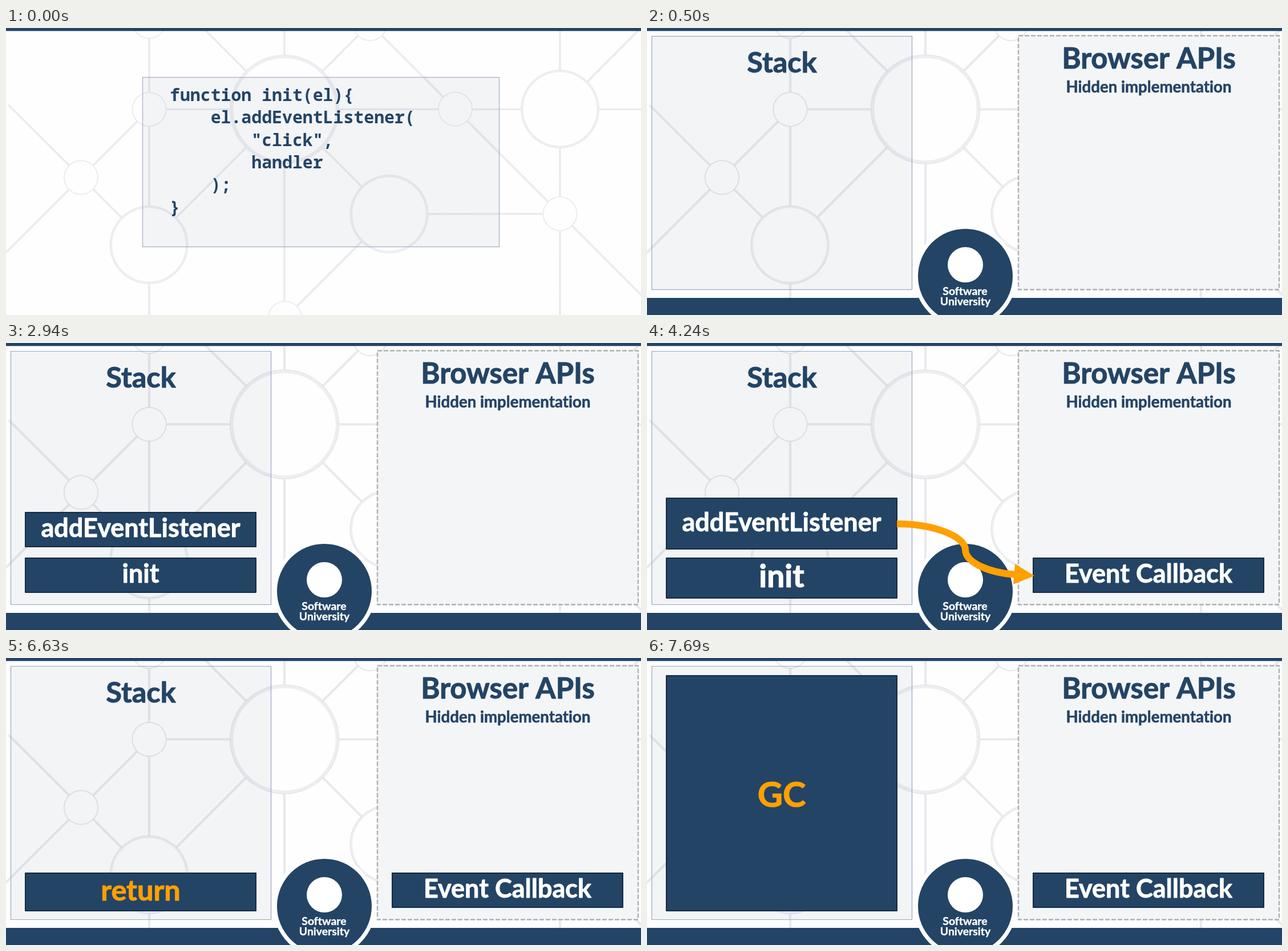
Recreate the animation shown at these times as an HTML page with a canvas. Size 1113x503 px, loop 8 s.

```html
<!DOCTYPE html>
<html lang="en">
<head>
<meta charset="utf-8">
<title>Call stack and browser APIs</title>
<style>
  html, body { margin: 0; width: 100%; height: 100%; overflow: hidden; background: #fff; }
  canvas { display: block; }
</style>
</head>
<body>
<canvas id="stage" width="1113" height="503"></canvas>
<script>
const W = 1113, H = 503, LOOP = 8000;
const NAVY = '#234465', EDGE = '#152c44', ORANGE = '#ffa000', PAPER = '#fefefe';
const TINT = 'rgba(35, 67, 101, 0.05)';
const SANS = 'Lato, sans-serif', MONO = '"Noto Sans Mono", monospace';
const ctx = document.getElementById('stage').getContext('2d');

function disc({ x, y }, r, color) {
  ctx.fillStyle = color;
  ctx.beginPath();
  ctx.arc(x, y, r, 0, Math.PI * 2);
  ctx.fill();
}

function rect(left, top, right, bottom, fill, stroke, width) {
  ctx.fillStyle = fill;
  ctx.fillRect(left, top, right - left, bottom - top);
  ctx.strokeStyle = stroke;
  ctx.lineWidth = width;
  ctx.strokeRect(left, top, right - left, bottom - top);
}

function text(str, x, y, size, color = NAVY) {
  ctx.font = `bold ${size}px ${SANS}`;
  ctx.letterSpacing = '0.01px'; // keeps letters apart instead of joined as ligatures
  ctx.textAlign = 'center';
  ctx.lineJoin = 'round';
  ctx.lineWidth = size * 0.02;
  ctx.fillStyle = ctx.strokeStyle = color;
  ctx.fillText(str, x, y);
  ctx.strokeText(str, x, y);
}

// The network grows out of one hub in straight and diagonal steps.
const SMALL = 30.5, MEDIUM = 69, LARGE = 96;
const step = (from, dx, dy, length, r) =>
  ({ x: from.x + dx * length, y: from.y + dy * length, r });

const hub = { x: 488, y: 142.5, r: LARGE };
const west = step(hub, -1, 0, 237, SMALL);
const northWest = step(west, 0, -1, 154, SMALL);
const farWest = step(west, -1, 1, 119.5, SMALL);
const southWest = step(hub, -1, 1, 237.5, MEDIUM);
const south = step(hub, 1, 1, 183.5, MEDIUM);
const bottom = step(south, -1, 1, 182.5, SMALL);
const north = step(hub, 1, -1, 150, SMALL);
const east = step(north, 1, 1, 149.5, SMALL);
const southEast = step(east, 1, 1, 183.5, SMALL);
const farEast = step(southEast, 0, -1, 183.5, MEDIUM);
const nodes = [hub, west, northWest, farWest, southWest, south, bottom, north, east, southEast, farEast];

const links = [
  [west, step(west, 1, 0, W)],
  [south, southEast],
  [south, bottom],
  [south, step(hub, -1, -1, hub.y)],
  [southWest, north],
  [southWest, step(farWest, -1, -1, 127)],
  [west, step(farWest, -1, 1, 200)],
  [north, step(southEast, 1, 1, 200)],
  [farEast, step(farEast, 1, -1, 200)],
  ...[west, hub, farEast].map(n => [step(n, 0, -1, H), step(n, 0, 1, H)])
];

function strokeLinks(color, width) {
  ctx.strokeStyle = color;
  ctx.lineWidth = width;
  ctx.beginPath();
  for (const [a, b] of links) {
    ctx.moveTo(a.x, a.y);
    ctx.lineTo(b.x, b.y);
  }
  ctx.stroke();
}

function network(outline, core) {
  ctx.fillStyle = PAPER;
  ctx.fillRect(0, 0, W, H);
  strokeLinks(outline, 3.6);
  strokeLinks(core, 1.8);
  for (const n of nodes) {
    disc(n, n.r, outline);
    disc(n, n.r - 0.8, '#eeeef2');
    disc(n, n.r - (n.r === SMALL ? 2 : n.r * 0.065), PAPER);
  }
  ctx.fillStyle = NAVY;
  ctx.fillRect(0, 0, W, 5.3);
}

const CODE = `function init(el){
    el.addEventListener(
        "click",
        handler
    );
}`;

function codeSlide() {
  network('#ebebee', '#ebebee');
  rect(239.5, 86.5, 864.5, 383.5, TINT, '#a3abbf', 1.2);
  ctx.font = `bold 29.85px ${MONO}`;
  ctx.letterSpacing = '0px';
  ctx.textAlign = 'left';
  ctx.fillStyle = NAVY;
  CODE.split('\n').forEach((row, i) => ctx.fillText(row, 287, 128 + i * 39.3));
}

function badge() {
  const center = { x: 558, y: 435 };
  disc(center, 90, PAPER);
  disc(center, 83, NAVY);
  disc({ x: 558, y: 415 }, 31, '#fff');
  text('Software', 557.5, 468, 19.4, '#fff');
  text('University', 558, 486, 19.4, '#fff');
}

function panels() {
  network('#dedfe3', '#eeeef0');
  rect(8.5, 14.5, 464.5, 458.5, TINT, '#9aa6c2', 1.2);
  ctx.setLineDash([8, 3]);
  rect(651, 13.5, 1108, 458.5, '#f4f5f6', '#b0b0b0', 2.4);
  ctx.setLineDash([]);
  ctx.fillStyle = NAVY;
  ctx.fillRect(0, 473, W, 30);
  badge();
  text('Stack', 236.5, 78, 50.5);
  text('Browser APIs', 879.5, 71, 50.8);
  text('Hidden implementation', 879.5, 112.5, 27.6);
}

// A navy label box; drop sets the baseline below its middle, in ems.
function box(label, top, bottom, size, { color = '#fff', left = 34, drop = 0.29 } = {}) {
  const width = 404;
  rect(left, top, left + width, bottom, NAVY, EDGE, 2);
  text(label, left + width / 2, (top + bottom) / 2 + drop * size, size, color);
}

function arrow() {
  ctx.strokeStyle = ctx.fillStyle = ORANGE;
  ctx.lineWidth = 12;
  ctx.beginPath();
  ctx.moveTo(438, 317);
  ctx.bezierCurveTo(505, 317, 558, 340, 558, 362);
  ctx.bezierCurveTo(558, 385, 600, 403, 647, 406);
  ctx.stroke();
  ctx.beginPath();
  ctx.moveTo(645, 387);
  ctx.lineTo(679, 408);
  ctx.lineTo(642, 423);
  ctx.fill();
}

const CALL_INIT = 1800, ADD_LISTENER = 2940, REGISTER = 4240;
const LISTENER_DONE = 5460, INIT_DONE = 6630, CLEAN_UP = 7690;

function stackSlide(t) {
  const during = (start, end) => t >= start && t < end;
  const orange = { color: ORANGE };
  panels();
  if (during(CALL_INIT, REGISTER)) box('init', 377, 437, 45);
  if (during(ADD_LISTENER, REGISTER)) box('addEventListener', 297, 357, 45);
  if (during(REGISTER, INIT_DONE)) box('init', 377, 447, 55);
  if (during(REGISTER, LISTENER_DONE)) box('addEventListener', 272, 361, 45);
  if (during(LISTENER_DONE, INIT_DONE)) box('return', 296, 362, 50.5, orange);
  if (during(INIT_DONE, CLEAN_UP)) box('return', 377, 443, 50.5, orange);
  if (during(CLEAN_UP, LOOP)) box('GC', 31, 443, 61, { color: ORANGE, drop: 0.39 });
  if (during(REGISTER, LOOP)) box('Event Callback', 377, 437, 45, { left: 677 });
  if (during(REGISTER, LISTENER_DONE)) arrow();
}

const origin = performance.now();
function frame() {
  const t = (performance.now() - origin) % LOOP;
  if (t < 500) codeSlide();
  else stackSlide(t);
  requestAnimationFrame(frame);
}
frame();
</script>
</body>
</html>
```
